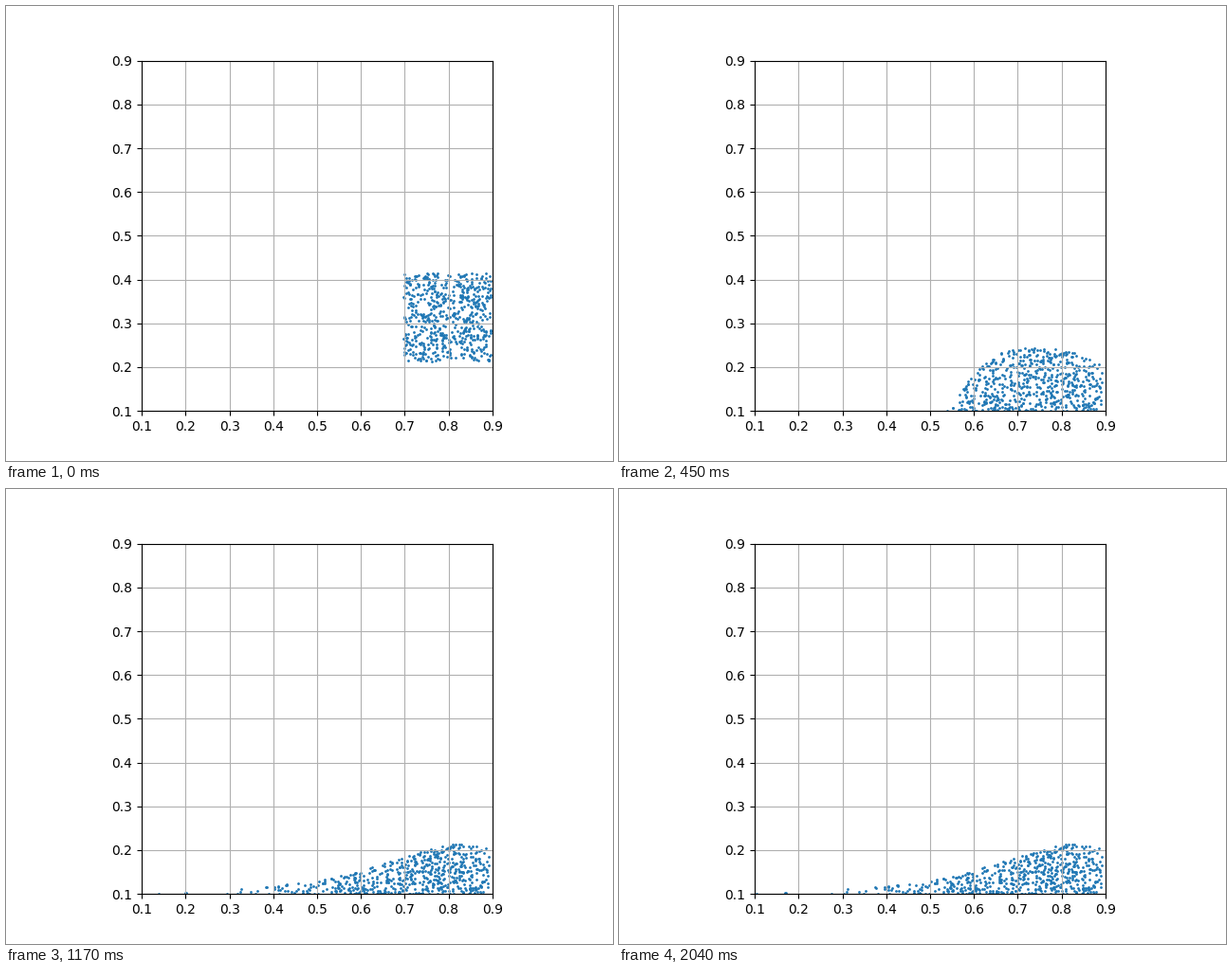
Recreate the animation shown at these times as a matplotlib script. Size 640 by 480 pixels, loop 2100 ms.

```python
import numpy as np
import matplotlib.pyplot as plt
from matplotlib.animation import FuncAnimation

FRAMES, INTERVAL = 70, 30
COUNT = 600
FLOOR, WALL = 0.1, 0.892
TOUCH, HEAP, REST = 10, 15, 53  # block lands, heap has formed, all settled
rng = np.random.default_rng(7)


def heap(across, up, n):
    """Grains under a bell-shaped surface that slumps and runs out left."""
    t = n - HEAP
    slump = 1 - np.exp(-t / 4.5)
    front = 0.1 + 0.44 * np.exp(-(t / 12.8) ** 1.4)
    peak = 0.75 + 0.08 * slump
    height = 0.138 - 0.030 * slump
    width = 0.185 + 0.079 * slump
    power = 3.5 - 1.9 * slump

    xs = np.linspace(front, WALL, 800)
    d = peak - xs
    left = np.exp(-(np.maximum(d, 0) / width) ** power)
    right = np.exp(-(np.minimum(d, 0) / 0.26) ** 2)
    taper = np.sqrt(np.clip((xs - front) / 0.06, 0, 1))
    h = (height * left * right + 0.006) * taper

    # The thin tail holds fewer grains.
    mass = np.cumsum(h * np.minimum(1, h / 0.035) + 1e-7)
    mass = (mass - mass[0]) / (mass[-1] - mass[0])
    x = np.interp(across, mass, xs)
    level = np.maximum(0, 1.02 * up - 0.02)
    return np.column_stack([x, FLOOR + level * np.interp(x, xs, h)])


def transport(points, goal, rounds=300):
    """Move one cloud onto another with short paths (sliced matching)."""
    points = points.copy()
    for angle in rng.uniform(0, np.pi, rounds):
        d = np.array([np.cos(angle), np.sin(angle)])
        p = points @ d
        order = np.argsort(p)
        points[order] += np.outer(np.sort(goal @ d) - p[order], d)
    return points


def falling(start, n):
    """The block drops and drifts left, held back along the wall."""
    x, y = start.T
    free = np.clip(0.27 + (0.897 - x) / 0.055, 0, 1)
    drop = 0.0078 * n + 0.000245 * n * n
    return np.column_stack([x - 0.0044 * n * free, y - drop])


def bridge(p, v, q, w, span):
    """Smooth steps from p with speed v to q with speed w."""
    for s in np.arange(1, span) / span:
        ease = s * s * (3 - 2 * s)
        turn = span * s * (1 - s) * ((1 - s) * v - s * w)
        yield p + (q - p) * ease + turn


def build_path():
    across, up = rng.random((2, COUNT))
    across = (across - across.min()) / np.ptp(across)
    heaps = np.array([heap(across, up, min(n, REST))
                      for n in range(HEAP, FRAMES)])
    # Grains never slide back up the heap.
    heaps[..., 0] = np.minimum.accumulate(heaps[..., 0], axis=0)

    low, high = np.array([0.696, 0.214]), np.array([0.897, 0.414])
    block = rng.uniform(low, high, (COUNT, 2))
    start = np.clip(transport(heaps[0], block), low, high)
    falls = [falling(start, n) for n in range(TOUCH + 1)]

    impact = bridge(falls[-1], falls[-1] - falls[-2],
                    heaps[0], heaps[1] - heaps[0], HEAP - TOUCH)
    path = np.array([*falls, *impact, *heaps])
    path[..., 1] = np.maximum(path[..., 1], FLOOR)
    return path


path = build_path()

fig, ax = plt.subplots(figsize=(6.4, 4.8), dpi=100)
grains = ax.scatter(*path[0].T, s=1)
ax.set_aspect("equal")
ax.set_xlim(0.1, 0.9)
ax.set_ylim(0.1, 0.9)
ax.grid(True)


def update(n):
    grains.set_offsets(path[n])
    return (grains,)


anim = FuncAnimation(fig, update, frames=FRAMES, interval=INTERVAL,
                     repeat=True, repeat_delay=0)
plt.show()
```
